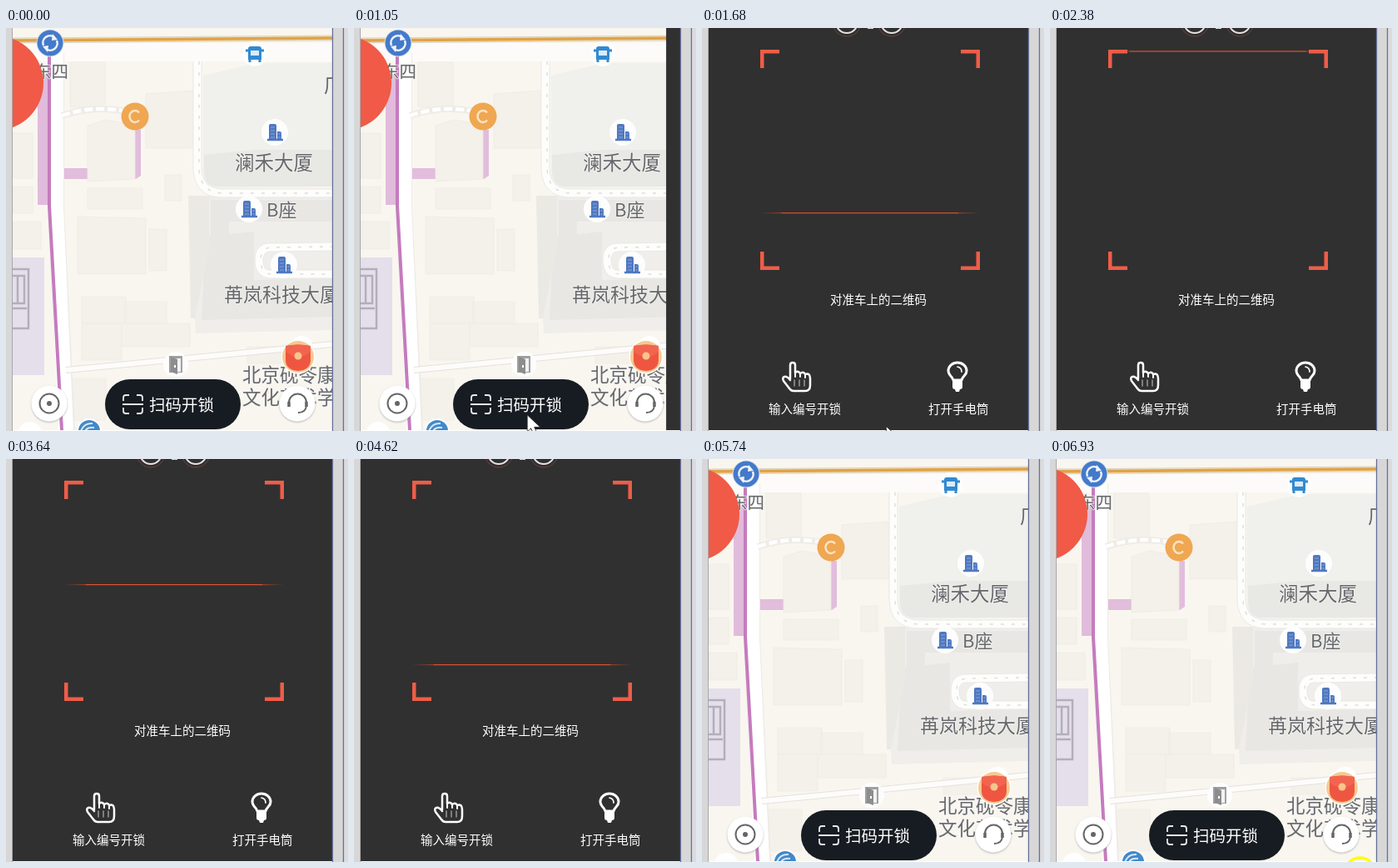
An HTML page for the animation above (7070 ms loop, 411 by 483 pixels).

```html
<!DOCTYPE html>
<html lang="zh">
<head>
<meta charset="utf-8">
<title>扫码开锁</title>
<style>
  html, body { margin: 0; width: 100%; height: 100%; overflow: hidden; background: #fff; }
  svg { display: block; width: 411px; height: 483px; }
  text { font-family: "Noto Sans CJK SC", "Noto Sans CJK", sans-serif; }
  .label text { fill: #66686e; stroke: #f4f3ef; stroke-width: 1.5px; paint-order: stroke; font-weight: 500; }
  .ui text { fill: #fff; font-size: 14.5px; }
</style>
</head>
<body>
<svg viewBox="0 0 411 483">
  <defs>
    <clipPath id="screen"><rect x="8" width="384" height="482"/></clipPath>
    <linearGradient id="beam">
      <stop offset="0" stop-color="#d9532f" stop-opacity="0"/>
      <stop offset=".1" stop-color="#d9532f" stop-opacity=".6"/>
      <stop offset=".1" stop-color="#d9532f"/>
      <stop offset=".9" stop-color="#d9532f"/>
      <stop offset=".9" stop-color="#d9532f" stop-opacity=".6"/>
      <stop offset="1" stop-color="#d9532f" stop-opacity="0"/>
    </linearGradient>
    <filter id="shadow" x="-20%" y="-20%" width="140%" height="140%">
      <feDropShadow dx="0" dy="1" stdDeviation="1.3" flood-color="#777" flood-opacity=".55"/>
    </filter>
    <g id="tower">
      <circle r="16" fill="#fdfdfd"/>
      <path d="M-7-8Q-7-10-5-10H0Q2-10 2-8V9H-7ZM3-1H6Q8-1 8 1V9H3Z" fill="#4f78c0"/>
      <path d="M-5-6H0M-5-2H0M-5 2H0M-5 6H0M4 2H7M4 6H7" stroke="#86a3d6" stroke-width="1.2"/>
      <path d="M-9 9H10" stroke="#4f78c0" stroke-width="2.5"/>
    </g>
    <path id="corner" d="M0 0H23V4.5H4.5V22H0Z" fill="#ee5d48"/>
    <path id="lane" d="M230 40V168Q231 197 258 198H392M392 262L316 263Q304 264 304 278Q304 295 318 295H392" fill="none"/>
  </defs>

  <g clip-path="url(#screen)">
    <g id="map">
      <path d="M8 0H392V482H8Z" fill="#f9f6f0"/>
      <path d="M8 275H46V416H8Z" fill="#e4dfeb"/>

      <path d="M237 57L300 42H392V190L250 192Q237 190 237 170Z" fill="#f0f0ec"/>
      <path d="M238 152L300 146H392V190H252Q238 188 238 170Z" fill="#e8e8e4"/>
      <path d="M219 201H392V362L228 366Z" fill="#efeeea"/>
      <path d="M246 206H392V232H268V250H246ZM240 250L298 244V302L392 300V346L235 350Z" fill="#e8e7e3"/>
      <path d="M219 201H244V264L227 348H222Z" fill="#ebe9e4"/>

      <path d="M38 55H50V212H38Z" fill="#e1bbdb"/>
      <path d="M70 168H155V122H162V177L156 181H70Z" fill="#e2bddc"/>

      <g fill="#f4f0ea" stroke="#efebe4" stroke-width=".8">
        <path d="M98 117L120 110L155 116V181L98 184ZM168 79L224 75V144H168ZM77 41H119V95H77Z"/>
        <path d="M98 192H164V217H98ZM191 176H211V207H191ZM86 226L168 228V295H86Z"/>
        <path d="M172 241H193V291H172ZM91 322H144V354H91ZM143 328H193V354H143ZM91 354H139V398H91ZM139 354H221V382H139Z"/>
        <path d="M8 126H32V180H8ZM8 190H32V222H8ZM8 232H42V265H8ZM78 420H120V470H78ZM290 382H335V402H290Z"/>
      </g>

      <path d="M8 289H27V360H8M8 297H22V330H8M8 336H25M14 297V330" fill="none" stroke="#b2afba" stroke-width="2.5"/>

      <path d="M8 18H392V40H8Z" fill="#fcfbf9"/>
      <path d="M60 30V215L73 482" fill="none" stroke="#eeebe7" stroke-width="20"/>
      <path d="M60 30V215L72 482" fill="none" stroke="#fff" stroke-width="18"/>
      <path d="M72 410L392 379" stroke="#e4e2dd" stroke-width="8"/>
      <path d="M72 410L392 379" stroke="#fdfcfa" stroke-width="6"/>
      <path d="M67 105Q105 92 145 100" fill="none" stroke="#efece7" stroke-width="8"/>
      <path d="M67 105Q105 92 145 100" fill="none" stroke="#fff" stroke-width="4.5" stroke-dasharray="10 4"/>

      <use href="#lane" stroke="#e9e8e4" stroke-width="11"/>
      <use href="#lane" stroke="#fdfdfb" stroke-width="9"/>
      <use href="#lane" stroke="#dededa" stroke-width="1.5" stroke-dasharray="4 9" x="2"/>

      <path d="M8 15L392 12" stroke="#d9d5cd" stroke-width="7"/>
      <path d="M8 15L392 12" stroke="#f5dfb5" stroke-width="5"/>
      <path d="M8 15L392 12" stroke="#dfa347" stroke-width="3.5"/>
      <path d="M52 20V213L67 482" fill="none" stroke="#c57bbd" stroke-width="4"/>

      <g class="label">
        <text x="34" y="60" font-size="20.5">东四</text>
        <text x="382" y="77" font-size="23">厂</text>
        <text x="275" y="169.500" font-size="23.500">澜禾大厦</text>
        <text x="313" y="226" font-size="22">B座</text>
        <text x="262" y="328" font-size="23">苒岚科技大厦</text>
        <text x="284" y="424" font-size="22.500">北京砚苓康</text>
        <text x="284" y="451" font-size="22.500">文化艺术学</text>
      </g>

      <g transform="translate(53 18)">
        <circle r="16.500" fill="#dfe5ee"/>
        <circle r="15.500" fill="#447acb"/>
        <g id="turn">
          <path d="M-8 3A8.500 8.500 0 0 1 5-7" fill="none" stroke="#f0f4fa" stroke-width="2.500"/>
          <path d="M3-11L9-4L2-3Z" fill="#f0f4fa"/>
        </g>
        <use href="#turn" transform="rotate(180)"/>
      </g>
      <g transform="translate(299 31)">
        <circle r="15" fill="#fdfdfd"/>
        <path d="M-8-6Q-8-9-5-9H5Q8-9 8-6V7H-8Z" fill="#318ad1"/>
        <path d="M-11-4H11M-6 6V10M6 6V10" stroke="#318ad1" stroke-width="3"/>
        <path d="M-5-4H5V2H-5Z" fill="#dcebf7"/>
      </g>
      <use href="#tower" x="323" y="125"/>
      <use href="#tower" x="292" y="217"/>
      <use href="#tower" x="334" y="284"/>
      <g transform="translate(204 403)">
        <circle r="15" fill="#fdfdfd"/>
        <path d="M-8-10H8V10H-8Z" fill="#a0a0a0"/>
        <path d="M-1-7H6V9H-1Z" fill="#f2f2f2"/>
        <path d="M-6-9L2-6V12L-6 9Z" fill="#8d8d8d"/>
        <path d="M-1 1V4" stroke="#fff" stroke-width="2"/>
      </g>
      <circle cx="155" cy="106" r="16.500" fill="#efa751"/>
      <path d="M160 101.500A6.500 7 0 1 0 160 110.500" fill="none" stroke="#fbe3c0" stroke-width="2.500"/>

      <circle cx="-11.500" cy="66" r="56.500" fill="#f05a47"/>

      <circle cx="355" cy="382" r="13" fill="#fff"/>
      <g transform="translate(351 394)">
        <circle r="20.500" fill="#fff"/>
        <circle r="19" fill="#f6c98f"/>
        <path d="M-15-13Q0-16 15-13V5Q14 16 0 17Q-14 16-15 5Z" fill="#ee5642"/>
        <path d="M-15-13Q0-16 15-13V-6Q0 6-15-6Z" fill="#f26450"/>
        <circle r="4.500" cy="-1" fill="#f8c68c"/>
      </g>

      <circle cx="29" cy="486" r="14" fill="#fff"/>
      <circle cx="100" cy="483" r="15" fill="#fff"/>
      <circle cx="100" cy="483" r="13" fill="#4189c9"/>
      <path d="M90 483Q94 473 104 474M95 483Q98 478 106 479" fill="none" stroke="#d7e7f5" stroke-width="2"/>

      <g fill="#fff" filter="url(#shadow)">
        <circle cx="52" cy="450" r="21.500"/>
        <circle cx="350" cy="450" r="21.500"/>
      </g>
      <g fill="none" stroke="#666" stroke-width="2">
        <circle cx="52" cy="450" r="11.500"/>
        <circle cx="52" cy="450" r="2" fill="#666"/>
        <path d="M340 453V449A10.500 10.500 0 0 1 361 449V453Q360 461 351 461"/>
        <path d="M340 448V454M361 448V454" stroke-width="3.500"/>
      </g>

      <rect x="119" y="421" width="163" height="60" rx="30" fill="#171c22"/>
      <path d="M141 447V443Q141 440 144 440H148M157 440H161Q164 440 164 443V447M164 455V459Q164 462 161 462H157M148 462H144Q141 462 141 459V455M140 451H165" fill="none" stroke="#e8e8e8" stroke-width="1.800"/>
      <text x="172" y="458.500" font-size="19.500" fill="#fff">扫码开锁</text>
    </g>

    <g id="panel" class="ui">
      <path d="M8 0H394V482H8Z" fill="#303030"/>
      <g fill="none">
        <g stroke="#71403b"><circle cx="174" cy="-7" r="17"/><circle cx="228" cy="-7" r="17"/></g>
        <g stroke="#e6e2e1" stroke-width="2"><circle cx="174" cy="-7" r="13"/><circle cx="228" cy="-7" r="13"/></g>
        <path d="M199 0H206" stroke="#ddd" stroke-width="2"/>
      </g>
      <use href="#corner" transform="translate(70 26)"/>
      <use href="#corner" transform="translate(334 26) scale(-1 1)"/>
      <use href="#corner" transform="translate(70 290) scale(1 -1)"/>
      <use href="#corner" transform="translate(334 290) scale(-1 -1)"/>
      <rect id="scan" x="70" width="264" height="1.200" fill="url(#beam)"/>
      <text x="154" y="331">对准车上的二维码</text>
      <text x="80" y="462">输入编号开锁</text>
      <text x="272" y="462" font-size="14.400">打开手电筒</text>

      <g fill="none" stroke="#fff" stroke-width="2.500" stroke-linejoin="round" stroke-linecap="round">
        <path d="M106 420V404Q106 401 109 401Q112 401 112 404V413Q115 410 118 414Q122 411 124 415Q130 413 130 420V428Q130 435 124 435H110Q107 435 105 432L98 423Q96 419 99 418Q102 417 106 422"/>
        <path d="M112 413V418M118 414V418M124 415V419" stroke-width="2"/>
        <path d="M111 422V429M117 422V429M123 422V429" stroke="#aaa" stroke-width="1.300"/>
        <path d="M302 422Q301 419 298 416Q296 413 296 411A11 10 0 0 1 318 411Q318 414 315 417Q313 419 312 422Z" stroke-width="3"/>
        <path d="M307 406Q312 407 312 412" stroke-width="1.700"/>
      </g>
      <path d="M301 423H313V430Q313 433 310 433L309 436H305L304 433Q301 433 301 430Z" fill="#fff"/>
    </g>
  </g>

  <path d="M0 0H7V483H0ZM393 0H405V483H393Z" fill="#d7d7d7"/>
  <path d="M406 0H411V483H406Z" fill="#dcdbdc"/>
  <path d="M7.500 0V483" stroke="#a9a9ad"/>
  <path d="M392.500 0V483M405.500 0V483" stroke="#65709a" stroke-width="1.300"/>

  <circle id="ring" r="18.500" fill="none" stroke="#ffff00" stroke-width="3.500"/>
  <path id="cursor" d="M0 0V20L4.500 16L8 24L12 22L8.500 14.500H15.500Z" fill="#fff" stroke="#222" stroke-width=".8"/>
</svg>
<script>
  const LOOP = 7070, STEP = 70, WIDTH = 385;
  const [panel, scan, ring, cursor] = ["panel", "scan", "ring", "cursor"].map(id => document.getElementById(id));

  const clamp = v => Math.min(1, Math.max(0, v));
  const swing = (t, start, length) => 0.5 - Math.cos(clamp((t - start) / length) * Math.PI) / 2;

  // Linear interpolation through [time, ...values] keys.
  function track(t, keys) {
    const next = keys.findIndex(key => key[0] > t);
    if (next < 0) return keys[keys.length - 1].slice(1);
    if (next === 0) return keys[0].slice(1);
    const a = keys[next - 1], b = keys[next];
    const p = (t - a[0]) / (b[0] - a[0]);
    return a.slice(1).map((v, i) => v + (b[i + 1] - v) * p);
  }

  const scanKeys = [[1050, 158], [1330, 186], [2366, 290], [2366, 26], [3640, 150],
                    [4620, 246], [5080, 290], [5080, 26], [5460, 62], [5810, 96]];
  const cursorKeys = [[350, 218, 484], [700, 206, 464], [980, 206, 464],
                      [1330, 217, 463], [1890, 224, 486]];

  function place(node, x, y, visible) {
    node.setAttribute("transform", `translate(${x} ${y})`);
    node.setAttribute("visibility", visible ? "visible" : "hidden");
  }

  function draw(t) {
    const offset = WIDTH * (1 - swing(t, 985, 470) + swing(t, 5219, 500));
    place(panel, offset, 0, offset < WIDTH);
    scan.setAttribute("y", track(t, scanKeys)[0]);

    const returning = t >= 6720 && t < 6790;
    const [x, y] = returning ? [394, 478] : track(t, cursorKeys);
    place(cursor, x, y, returning || (t >= 420 && t < 1890));

    const secondClick = t >= 6930;
    const [cx, cy] = secondClick ? [372.5, 496.5] : [201.5, 458.5];
    place(ring, cx, cy, secondClick || (t >= 910 && t < 1050));
  }

  const start = performance.now();
  function tick() {
    const t = (performance.now() - start) % LOOP;
    draw(Math.floor(t / STEP) * STEP);
    requestAnimationFrame(tick);
  }
  tick();
</script>
</body>
</html>
```
